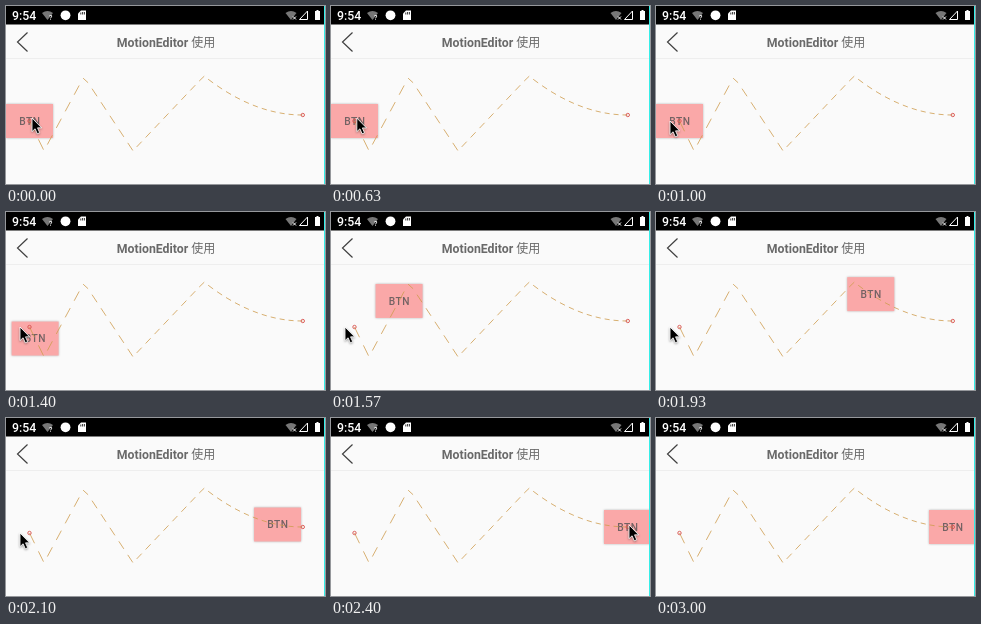
These frames come from a looping animation (319 px wide and 178 px high, 3360 ms). An HTML page:

```html
<!DOCTYPE html>
<html lang="zh-CN">
<head>
<meta charset="utf-8">
<title>MotionEditor</title>
<style>
  html, body { margin: 0; width: 100%; height: 100%; overflow: hidden; background: #fafafa; }
  svg { display: block; width: 100vw; height: 100vh; }
  text { font-family: Roboto, "Noto Sans CJK SC", "Noto Sans CJK", sans-serif; font-weight: 500; }
  #title { font-size: 12px; fill: #696969; }
  #title .latin { font-size: 12.3px; font-weight: 700; }
  #btn rect { fill: #faa8a8; filter: drop-shadow(0 .6px .8px rgba(0, 0, 0, .28)); }
  #cursor { filter: drop-shadow(0 1px 1px rgba(0, 0, 0, .35)); }
</style>
</head>
<body>
<svg viewBox="0 0 319 178" preserveAspectRatio="none">
  <rect width="319" height="178" fill="#fafafa"/>

  <!-- title bar -->
  <rect y="52" width="319" height="1" fill="#eeeeee"/>
  <path d="M21.500 26.500 11.500 36 21.500 45.500" fill="none" stroke="#404040" stroke-width="1.2"/>
  <text id="title" x="160" y="40.600" text-anchor="middle"><tspan class="latin">MotionEditor</tspan> 使用</text>

  <!-- status bar -->
  <rect width="319" height="18.500" fill="#000"/>
  <text x="6" y="13.800" font-size="12.3" fill="#fff">9:54</text>
  <path d="M36 7Q41.500 3 47 7L41.500 14Z" fill="#777"/>
  <text x="43" y="14" font-size="7" fill="#fff">?</text>
  <circle cx="59.500" cy="9.300" r="4.900" fill="#fff"/>
  <path d="M75 4.500H80V14H72V7.500Z" fill="#fff"/>
  <path d="M74.800 6.500v2M76.600 6v2.500M78.400 6v2.500" stroke="#000" stroke-width=".8"/>
  <path d="M279.500 7Q285 3 290.500 7L285 14Z" fill="#777"/>
  <path d="M287 10.500l3 3m0-3l-3 3" stroke="#fff" stroke-width="1"/>
  <path d="M301.500 5V13.500H293.500Z" fill="none" stroke="#fff"/>
  <path d="M309 5h1.500V4h2v1H314V14H309Z" fill="#fff"/>

  <g id="btn">
    <rect x="-23.5" y="-17" width="47" height="34"/>
    <text x=".3" y="3.700" font-size="10.2" letter-spacing=".5" fill="#736263" text-anchor="middle">BTN</text>
  </g>

  <path id="trail" fill="none" stroke="#cf9c4e" stroke-width=".8"/>
  <g fill="none" stroke="#d9534f" stroke-width=".9">
    <circle cx="23.500" cy="115" r="1.700"/>
    <circle cx="296.800" cy="109" r="1.700"/>
  </g>

  <g id="cursor">
    <path d="M0 0V14.500L3.300 11.500 5.600 16.800 8.200 15.700 5.900 10.500H10.300Z"
          transform="scale(.94)" fill="#000" stroke="#fff" stroke-width=".9"/>
  </g>
  <rect x="318" width="1" height="178" fill="#35eee8"/>
</svg>
<script>
  const LOOP = 3360;
  const START = 23.5, END = 296.5;
  const DASHES = 31, DASH_RATIO = 0.56;
  const corners = [[START, 115], [38, 144.8], [78, 70.5], [127, 144.8], [198, 70]];
  const $ = id => document.getElementById(id);
  const clamp = v => Math.min(1, Math.max(0, v));
  const ease = v => (1 - Math.cos(Math.PI * clamp(v))) / 2;
  const place = (el, x, y) => el.setAttribute('transform', `translate(${x.toFixed(2)} ${y.toFixed(2)})`);

  // Straight zigzag, then a parabola that levels out at the end.
  function pathY(x) {
    for (let i = 1; i < corners.length; i++) {
      const [x0, y0] = corners[i - 1], [x1, y1] = corners[i];
      if (x <= x1) return y0 + (y1 - y0) * (x - x0) / (x1 - x0);
    }
    return 109 - 39 * ((END - x) / (END - 198)) ** 2;
  }

  // Dashes are evenly spaced in x, so steep parts get longer ones.
  const point = x => `${x.toFixed(2)} ${pathY(x).toFixed(2)}`;
  const pitch = (END - START) / (DASHES - 1 + DASH_RATIO);
  let d = '';
  for (let i = 0; i < DASHES; i++) {
    const x = START + i * pitch;
    d += `M${point(x)}L${point(x + pitch * DASH_RATIO)}`;
  }
  $('trail').setAttribute('d', d);

  function cursorAt(t) {
    if (t < 2110) {
      const k = ease((t - 600) / 400);
      return [26 - 12 * k, 112 + 3 * k];
    }
    const k = ease((t - 2110) / 190), m = 1 - k;
    const curve = (a, b, c) => m * m * a + 2 * m * k * b + k * k * c;
    return [curve(14, 150, 298), curve(115, 190, 107)];
  }

  function draw(t) {
    const x = START + (END - START) * ease((t - 1311) / 982);
    place($('btn'), x, pathY(x));
    place($('cursor'), ...cursorAt(t));
    $('cursor').style.visibility = t < 3000 ? 'visible' : 'hidden';
  }

  const begin = performance.now();
  function tick() {
    draw((performance.now() - begin) % LOOP);
    requestAnimationFrame(tick);
  }
  draw(0);
  requestAnimationFrame(tick);
</script>
</body>
</html>
```
